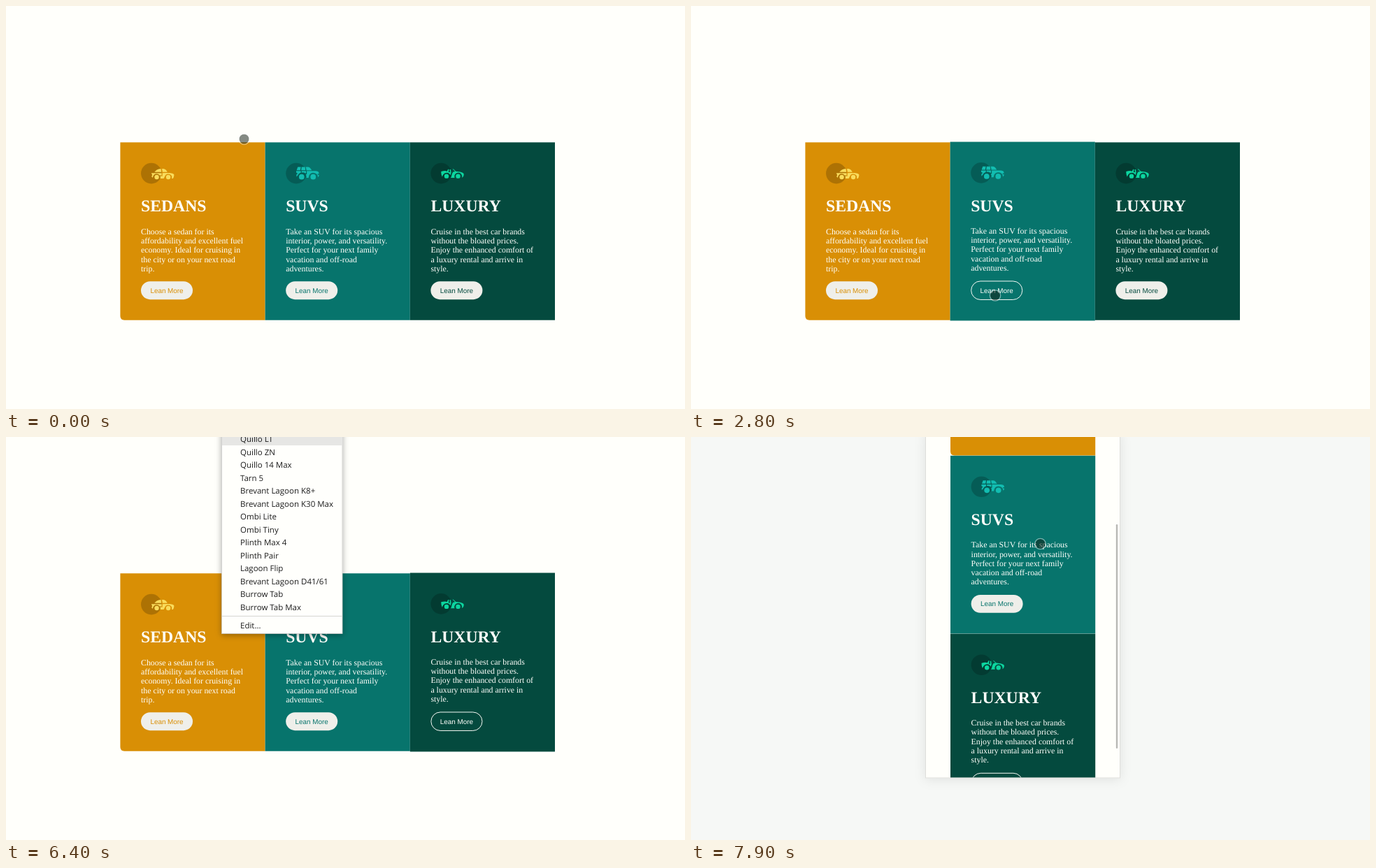
Write an HTML page that moves like this. It is 971 by 577 pixels and loops after 8000 ms.

```html
<!DOCTYPE html>
<html lang="en">
<head>
<meta charset="utf-8">
<title>Car cards</title>
<style>
  html, body { margin: 0; width: 100%; height: 100%; overflow: hidden; background: #fffffb; }
  svg { display: block; width: 971px; height: 577px; text-rendering: geometricPrecision; }
  .title { font: bold 32px "Liberation Serif", "Times New Roman", serif; fill: #fffffb; }
  .copy { font: 16px "Liberation Serif", "Times New Roman", serif; fill: #fffffb; }
  .label { font: 13.33px "Liberation Sans", Arial, sans-serif; text-anchor: middle; }
  .item { font: 11.5px "Open Sans", "Noto Sans", sans-serif; fill: #1d1d1d; }
</style>
</head>
<body>
<svg viewBox="0 0 971 577" xmlns="http://www.w3.org/2000/svg">
  <defs>
    <clipPath id="screen"><rect x="336" y="-6" width="277" height="493.5"/></clipPath>
    <filter id="soft" x="-20%" y="-20%" width="140%" height="140%">
      <feDropShadow dx="0" dy="2" stdDeviation="4" flood-color="#000" flood-opacity=".33"/>
    </filter>
    <filter id="wide" x="-20%" y="-20%" width="140%" height="140%">
      <feDropShadow dx="0" dy="2" stdDeviation="8" flood-color="#000" flood-opacity=".09"/>
    </filter>
  </defs>
  <rect id="page" width="971" height="577"/>
  <rect id="phone" x="335.5" y="-6" width="278" height="494" fill="#fffffb" stroke="#dededb" filter="url(#wide)"/>
  <g id="cards"></g>
  <rect id="thumb" x="607.8" width="2.4" height="321" rx="1.2" fill="#b8b8b5"/>
  <g id="menu">
    <rect x="308.5" y="-20" width="172.5" height="301.5" fill="#fffffc" stroke="#c9c9c6" stroke-width=".8" filter="url(#soft)"/>
    <rect id="pick" x="309" y="-1" width="171.6" height="13" fill="#e6e6e4"/>
    <path d="M309 256.5H480.6" stroke="#d5d5d2"/>
  </g>
  <g id="cursor">
    <circle r="7" fill="rgba(20,30,22,.52)"/>
    <circle r="7.7" fill="none" stroke="rgba(255,255,255,.45)" stroke-width="1.3"/>
  </g>
</svg>
<script>
const $ = id => document.getElementById(id);
const NS = "http://www.w3.org/2000/svg";
const LOOP = 8000, ZOOM = 0.74, CARD_W = 280, CARD_H = 344;

function add(parent, tag, attrs, text) {
  const el = document.createElementNS(NS, tag);
  for (const k in attrs) el.setAttribute(k, attrs[k]);
  if (text) el.textContent = text;
  return parent.appendChild(el);
}
const show = (el, on) => el.setAttribute("visibility", on ? "visible" : "hidden");

const models = [
  {
    name: "SEDANS", bg: "#d98f05", ink: "#f9dc5c", wheelY: 27.3, wheelR: 4.3,
    copy: ["Choose a sedan for its", "affordability and excellent fuel", "economy. Ideal for cruising in",
           "the city or on your next road", "trip."],
    car: "M26 17.6C29 14 32 11.2 38.5 11L39.5 17.6ZM40.6 11C47 11 49 13.6 51 17.6H41.6Z" +
         "M20 19.4H40V24H36A7 7 0 0 0 23.5 26L22 28.5L20.5 25.5L22 23.5Z" +
         "M41.5 19.4C53 18.8 62 19 64 22.5C64 26 63 29 61.5 30H59.5A7 7 0 0 0 46.3 25.5L44 30H37.5A8 8 0 0 0 37 25.4H41.5Z"
  },
  {
    name: "SUVS", bg: "#07746c", ink: "#12bdb1", wheelY: 26.8, wheelR: 5.2,
    copy: ["Take an SUV for its spacious", "interior, power, and versatility.", "Perfect for your next family",
           "vacation and off-road", "adventures."],
    car: "M23 7.8H29L27.8 14H20.8ZM30.6 7.8H37L38 14H29.6ZM38.6 7.8H43C46.5 8 48 11 50 14H39.8Z" +
         "M20 15.6H29V18.6A8.4 8.4 0 0 0 23 24L20.5 26.5V22H22V19H20Z" +
         "M30.5 15.6H39V20H37.5A8 8 0 0 0 30.5 18.4Z" +
         "M40.5 15.6H58C63 16 64 18 64 21H61.5V23H64V25L62 27.5A9 9 0 0 0 45 24L43.8 28.5H39.8A9 9 0 0 0 38.4 22H40.5Z"
  },
  {
    name: "LUXURY", bg: "#044a3e", ink: "#0cd6a0", wheelY: 25.5, wheelR: 4.3,
    copy: ["Cruise in the best car brands", "without the bloated prices.", "Enjoy the enhanced comfort of",
           "a luxury rental and arrive in", "style."],
    car: "M20 16.5C25 15 29 15 31.5 16L33.5 12H35L34.5 18H37L36.6 12.5H38.6L39.4 19L38 23.5A8 8 0 0 0 24 22.5L22 26.5L20.5 22Z" +
         "M42 11.3L44 11.8L48.5 16.2C57 16.6 63 18.3 64 21.5C64 25 62.5 27.5 60.5 28.2A7.6 7.6 0 1 0 46 28.8H37.8C41 28 39.6 21 43.5 17L47 16.4Z"
  }
];

const cards = models.map((m, i) => {
  const g = add($("cards"), "g", {});
  const back = add(g, "path", { fill: m.bg });
  add(g, "circle", { cx: 60, cy: 60, r: 20, opacity: 0.2 });
  const icon = add(g, "g", { transform: "translate(40 40)", fill: m.ink });
  add(icon, "path", { d: m.car });
  for (const cx of [30.5, 52.8]) add(icon, "circle", { cx, cy: m.wheelY, r: m.wheelR });
  add(g, "text", { class: "title", x: 40, y: 134 }, m.name);
  m.copy.forEach((line, n) => add(g, "text", { class: "copy", x: 40, y: 177.5 + 18 * n }, line));
  const button = add(g, "rect", { x: 40, y: 269, width: 100 });
  const label = add(g, "text", { class: "label", x: 90 }, "Lean More");
  return { g, back, button, label, bg: m.bg, corner: i ? 0 : 8 };
});

function placeCard(card, x, y, hover) {
  const h = CARD_H + (hover ? 2 : 0), r = card.corner, bh = hover ? 37 : 35;
  const inset = hover ? 0.6 : 0;
  card.g.setAttribute("transform", `translate(${x} ${y}) scale(${ZOOM})`);
  card.back.setAttribute("d", `M0 0H${CARD_W}V${h}H${r}Q0 ${h} 0 ${h - r}Z`);
  const look = {
    x: 40 + inset, y: 269 + inset, width: 100 - 2 * inset, height: bh - 2 * inset, rx: bh / 2 - inset,
    fill: hover ? "none" : "#efefea", stroke: hover ? "#fffffb" : "none", "stroke-width": 1.3
  };
  for (const k in look) card.button.setAttribute(k, look[k]);
  card.label.setAttribute("y", 269 + bh / 2 + 4.6);
  card.label.setAttribute("fill", hover ? "#fffffb" : card.bg);
}

["Quillo LT", "Quillo ZN", "Quillo 14 Max", "Tarn 5", "Brevant Lagoon K8+", "Brevant Lagoon K30 Max",
 "Ombi Lite", "Ombi Tiny", "Plinth Max 4", "Plinth Pair", "Lagoon Flip", "Brevant Lagoon D41/61",
 "Burrow Tab", "Burrow Tab Max"].forEach((name, i) =>
  add($("menu"), "text", { class: "item", x: 335, y: 7 + 18.5 * i }, name));
add($("menu"), "text", { class: "item", x: 335, y: 274 }, "Edit…");

// Pointer moves: start time, number of 100 ms steps, end x, end y
const moves = [
  [0, 1, 340.5, 190.5], [400, 1, 300, 253], [600, 3, 244, 397], [1000, 1, 237, 412], [1600, 1, 268, 414],
  [1800, 4, 434, 413], [2800, 1, 435, 414.5], [2900, 3, 667, 413], [3600, 6, 479.5, 86],
  [4400, 3, 451.5, 31.5], [6900, 1, 415, 12], [7000, 1, 480.5, 89], [7200, 1, 504, 138],
  [7700, 1, 497, 147.5], [7800, 2, 499.5, 153]
];
const smooth = p => p * p * (3 - 2 * p);

function pointer(t) {
  let x = 0, y = 0;
  for (const [start, steps, ex, ey] of moves) {
    if (t < start) break;
    const p = smooth(Math.min(1, (Math.floor((t - start) / 100) + 1) / steps));
    x += (ex - x) * p;
    y += (ey - y) * p;
  }
  return [x, y];
}

function scrollAt(t) {
  if (t < 7700) return 0;
  return t < 7800 ? 8.6 : t < 7900 ? 92 : 200.1;
}

function hovered(t) {
  return t < 1200 ? -1 : t < 2800 ? 0 : t < 3400 ? 1 : 2;
}

function draw(t) {
  const mobile = t >= 6600, over = hovered(t), scroll = scrollAt(t);
  $("page").setAttribute("fill", mobile ? "#f6f8f6" : "#fffffb");
  show($("phone"), mobile);
  $("cards").setAttribute("clip-path", mobile ? "url(#screen)" : "none");
  cards.forEach((card, i) => {
    const on = i === over;
    if (mobile) placeCard(card, 371, -28 - scroll + i * (CARD_H * ZOOM + 0.4), on);
    else placeCard(card, 163.4 + i * CARD_W * ZOOM, 195.2 - (on ? ZOOM : 0), on);
  });
  show($("thumb"), t >= 7700);
  $("thumb").setAttribute("y", (scroll - 8.6) * 0.653);
  show($("menu"), t >= 5800 && !mobile);
  show($("pick"), t >= 6400 && !mobile);
  show($("cursor"), t < 4800 || t >= 6900);
  $("cursor").setAttribute("transform", `translate(${pointer(t)})`);
}

const begin = performance.now();
function tick() {
  draw((performance.now() - begin) % LOOP);
  requestAnimationFrame(tick);
}
tick();
</script>
</body>
</html>
```
